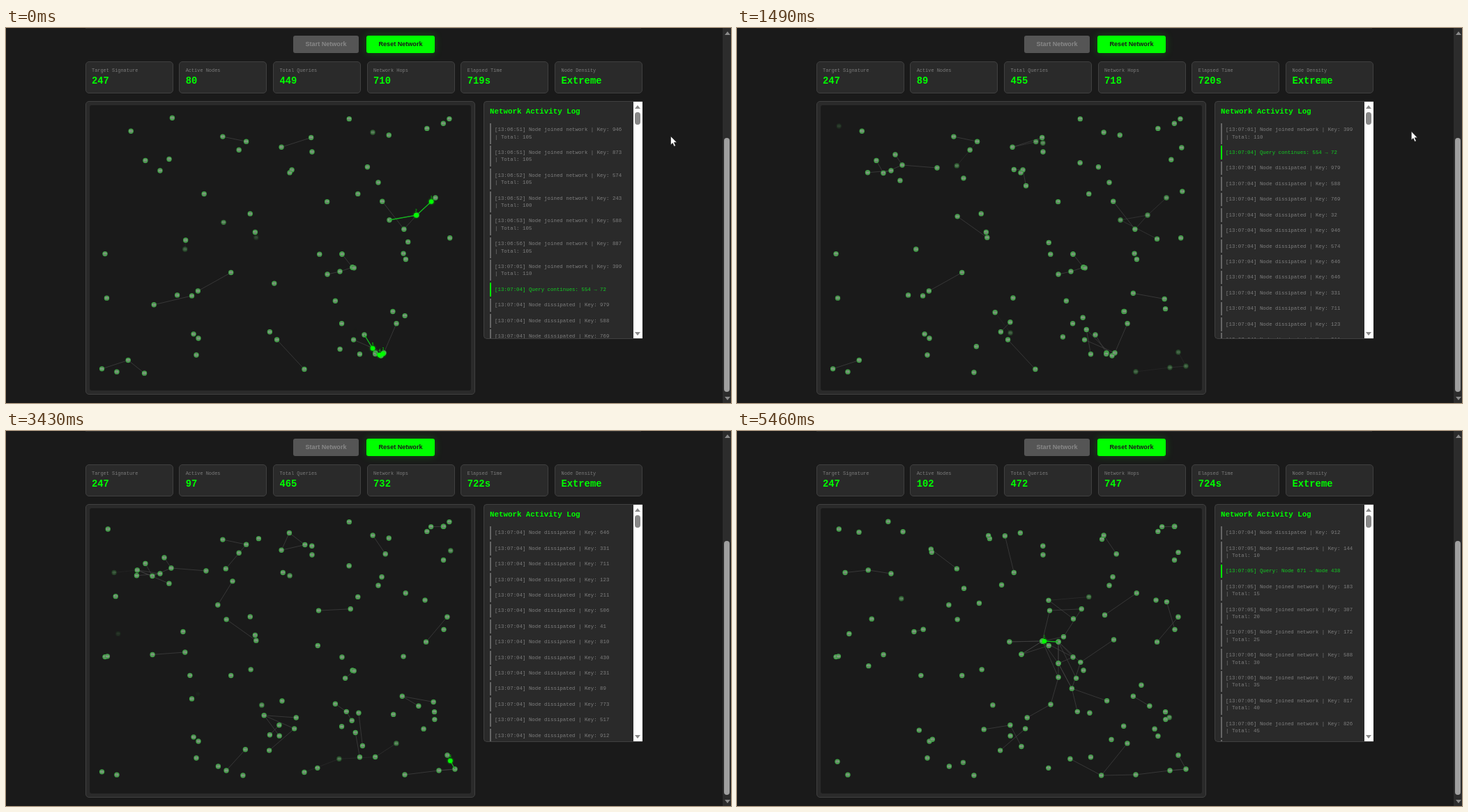
An HTML page with a canvas for the animation above (5540 ms loop, 1040 px wide and 539 px high).

```html
<!DOCTYPE html>
<html lang="en">
<head>
<meta charset="utf-8">
<title>Network simulation</title>
<style>
html, body { margin: 0; width: 100%; height: 100%; overflow: hidden; background: #1a1a1a; }
body { position: relative; font-family: "Liberation Mono", monospace; }
body * { box-sizing: border-box; position: absolute; }
.panel { background: #2a2a2a; border: 1px solid #404040; border-radius: 5px; }
.rule { left: 114px; top: 0; width: 797px; height: 1px; background: #303030; }
.button { top: 11px; height: 25px; border-radius: 3px; text-align: center;
  font: bold 9.07px/25px "Liberation Sans", sans-serif; }
#start { left: 412px; width: 94px; background: #555; color: #888; }
#reset { left: 517px; width: 98px; background: #0f0; color: #1a1a1a; box-shadow: 0 0 12px rgba(0,255,0,.25); }
.card { top: 47.5px; width: 126px; height: 46px; }
.card span, .card b { left: 8.5px; white-space: pre; }
.card span { top: 8px; font-size: 6.91px; line-height: 9px; color: #7c7c7c; }
.card b { top: 19px; font-size: 13.8px; line-height: 17px; color: #0f0; }
#net { left: 113.5px; top: 104.5px; width: 559.5px; height: 422.5px; }
#log { left: 685px; top: 104.5px; width: 227.5px; height: 342px; overflow: hidden; border-right: 0; border-radius: 5px 0 0 5px; }
#log h2 { left: 8px; top: 7px; margin: 0; font-size: 10.8px; line-height: 15px; color: #0f0; white-space: pre; }
#list { left: 8px; top: 31.2px; width: 204px; }
#list p { position: relative; margin: 0 0 2.85px; padding: 4.6px 0 4.6px 5px; border-left: 2px solid #666;
  font-size: 7.41px; line-height: 10.37px; color: #7e7e7e; white-space: pre; }
#list p.query { color: #12cc22; border-color: #0f0; }
#bar { right: 0; top: 0; width: 13px; height: 100%; background: #fff; }
#bar i { left: 2.5px; top: 15px; width: 8px; height: 18px; border-radius: 4px; background: #888; }
#page { left: 1028px; top: 0; width: 12px; height: 539px; background: #2c2c2c; }
#page i { left: 2px; top: 158px; width: 7.5px; height: 365px; border-radius: 4px; background: #9f9f9f; }
.up, .down { left: 2.5px; top: 5px; border: 4px solid transparent; border-top-width: 0; border-bottom: 5px solid #8a8a8a; }
.down { top: auto; bottom: 4px; transform: scaleY(-1); }
canvas, #cursor { left: 0; top: 0; }
</style>
</head>
<body>
<div class="rule"></div>
<div id="start" class="button">Start Network</div>
<div id="reset" class="button">Reset Network</div>
<div id="net" class="panel"></div>
<div id="log" class="panel">
  <h2>Network Activity Log</h2>
  <div id="list"></div>
  <div id="bar"><i></i><s class="up"></s><s class="down"></s></div>
</div>
<div id="page"><i></i><s class="up"></s><s class="down"></s></div>
<canvas id="view" width="1040" height="539"></canvas>
<svg id="cursor" width="12" height="18"><path d="M.5 .5V13L3.3 10.4 5.4 15.2 7.5 14.3 5.4 9.6H9.3Z" fill="#fff" stroke="#111" stroke-width=".6"/></svg>
<script>
const LOOP = 5540, RISE = 300, FALL = 150, HOP = 400;
const MARKS = [0, 870, 2040, 3430, 4210, 4910, 5460];
const $ = id => document.getElementById(id);
const lerp = (a, b, k) => a + (b - a) * k;
const clamp = v => Math.max(0, Math.min(1, v));

let seed = 247;
function random() {
  seed = (seed * 16807) % 2147483647;
  return seed / 2147483647;
}

function add(parent, tag, text, cls = '') {
  const el = document.createElement(tag);
  el.className = cls;
  el.textContent = text;
  return parent.appendChild(el);
}

// Whole part of the value between those given at MARKS
function count(values, t) {
  let i = 0;
  while (i < 5 && t >= MARKS[i + 1]) i++;
  const k = clamp((t - MARKS[i]) / (MARKS[i + 1] - MARKS[i]));
  return Math.floor(lerp(values[i], values[i + 1], k) + 1e-6);
}

const stats = [
  ['Target Signature', () => 247],
  ['Active Nodes', t => count([80, 84, 95, 97, 100, 98, 102], t)],
  ['Total Queries', t => count([449, 452, 458, 465, 467, 472, 472], t)],
  ['Network Hops', t => count([710, 714, 722, 732, 735, 747, 747], t)],
  ['Elapsed Time', t => 719 + Math.floor((t + 360) / 1000) + 's'],
  ['Node Density', () => 'Extreme']
].map(([label, value], i) => {
  const card = add(document.body, 'div', '', 'panel card');
  card.style.left = 113.5 + i * 134.7 + 'px';
  add(card, 'span', label);
  return { el: add(card, 'b', ''), value };
});

const entries = [];
const entry = (time, text, cls) => entries.push(add($('list'), 'p', `[13:${time}] ${text}`, cls));
const joined = (time, key, total) => entry(time, `Node joined network | Key: ${key}\n| Total: ${total}`);
joined('06:51', 946, 105);
joined('06:51', 873, 105);
joined('06:52', 574, 105);
joined('06:52', 243, 100);
joined('06:53', 588, 105);
joined('06:56', 887, 105);
joined('07:01', 399, 110);
entry('07:04', 'Query continues: 554 → 72', 'query');
for (const key of [979, 588, 769, 32, 946, 574, 646, 646, 331, 711, 123, 211, 506, 41, 810, 430, 231, 89, 773, 517, 912])
  entry('07:04', 'Node dissipated | Key: ' + key);
joined('07:05', 144, 10);
entry('07:05', 'Query: Node 671 → Node 438', 'query');
[183, 307, 172].forEach((key, i) => joined('07:05', key, 15 + i * 5));
[588, 660, 817, 826, 402].forEach((key, i) => joined('07:06', key, 30 + i * 5));

const nodes = [], links = [], queries = [];
const fade = (o, t) => clamp(Math.min((t - o.born) / RISE, (o.gone - t) / FALL));

// Packets leave at each start time and take one hop after another
function route(points, ...starts) {
  const born = Math.min(...starts) - 1000;
  const gone = Math.max(...starts) + HOP * points.length + 800;
  points.forEach(([x, y], i) => {
    nodes.push({ x, y, born, gone });
    if (i) links.push(nodes.slice(-2));
  });
  for (const start of starts) queries.push({ points, start });
}
const top1 = [461, 303], mid = [461, 334], low = [461, 354], left = [438, 302], end = [408, 321];
route([[550, 276], [589, 269], [616, 244]], -712, -392);
route([[514, 441], [530, 467], [538, 471], [542, 467]], -1080, -700, -300);
route([[482, 325], [497, 344], [479, 350], low], 200);
route([[227, 182], [237, 197], [287, 201]], 1660);
route([[572, 494], [621, 488], [644, 486], [633, 466]], 2390, 3435);
route([mid, top1, left], 4710);
route([top1, left, end], 4522, 4650);
route([left, end], 4522, 4678);
route([[450, 393], low, mid], 4522);

// Nodes that stay through the whole loop
for (const [x, y] of [[439, 178], [534, 222], [276, 446], [273, 470], [221, 205], [482, 325], [497, 344]])
  nodes.push({ x, y, born: -RISE, gone: 2 * LOOP });

// The rest join one by one at random places and dissipate later
const FIRST = 56, JOIN = 50;
for (let i = 0; i < FIRST + LOOP / JOIN; i++) {
  const born = i < FIRST ? -RISE : (i - FIRST) * JOIN - 200;
  const gone = i < FIRST ? 6200 * random() + FALL : born + 1500 + 6500 * random();
  nodes.push({ x: lerp(135, 645, random()), y: lerp(126, 506, random()), born, gone });
}

// Some close neighbours are linked
nodes.forEach((a, i) => {
  for (const b of nodes.slice(0, i)) {
    const d = Math.hypot(a.x - b.x, a.y - b.y);
    if (d > 8 && d < 60 && random() < .12) links.push([a, b]);
  }
});

const c = $('view').getContext('2d');
c.textAlign = 'center';
c.textBaseline = 'middle';
function line(x0, y0, x1, y1) {
  c.beginPath();
  c.moveTo(x0, y0);
  c.lineTo(x1, y1);
  c.stroke();
}
function dot(x, y, r) {
  c.beginPath();
  c.arc(x, y, r, 0, 7);
  c.fill();
}

function drawNode(n) {
  c.fillStyle = '#3fa546';
  dot(n.x, n.y, 3.7);
  c.fillStyle = '#6f806f';
  dot(n.x, n.y, 2.4);
  c.fillStyle = '#9c9';
  c.fillText(100 + Math.floor(n.x * n.y % 900), n.x, n.y);
}

function drawQuery({ points, start }, t, i) {
  const k = (t - start) / HOP, hop = Math.floor(k);
  if (k < 0 || hop + 1 >= points.length) return;
  const [x0, y0] = points[hop], [x1, y1] = points[hop + 1];
  const x = lerp(x0, x1, k % 1), y = lerp(y0, y1, k % 1);
  c.strokeStyle = '#12b81c';
  c.lineWidth = 1.3;
  line(x0, y0, x, y);
  c.shadowColor = '#0f0';
  c.shadowBlur = 3;
  c.fillStyle = '#0f0';
  dot(x, y, 3.2);
  c.shadowBlur = 0;
  c.fillText(i % 9 + 1, x, y - 6);
}

function drawNetwork(t) {
  c.globalAlpha = 1;
  c.clearRect(0, 0, 1040, 539);
  c.fillStyle = '#1a1a1a';
  c.beginPath();
  c.roundRect(120, 111, 547, 410, 3);
  c.fill();
  c.strokeStyle = '#444';
  c.lineWidth = .7;
  for (const [a, b] of links) {
    c.globalAlpha = Math.min(fade(a, t), fade(b, t));
    if (c.globalAlpha) line(a.x, a.y, b.x, b.y);
  }
  c.font = '3px "Liberation Mono", monospace';
  for (const n of nodes) {
    c.globalAlpha = fade(n, t);
    if (c.globalAlpha) drawNode(n);
  }
  c.globalAlpha = 1;
  c.font = '4.5px "Liberation Mono", monospace';
  queries.forEach((q, i) => drawQuery(q, t, i));
}

function frame(now) {
  const t = now % LOOP;
  for (const s of stats) s.el.textContent = s.value(t);
  const first = count([0, 3, 9, 15, 19, 23, 28], t);
  entries.forEach((e, i) => e.style.display = i < first ? 'none' : '');
  drawNetwork(t);
  const glide = clamp((t - 1260) / 470), x = lerp(953 + 2 * clamp(t / 800), 979, glide);
  $('cursor').style.transform = `translate(${x}px, ${lerp(155, 141, glide)}px)`;
  $('cursor').style.display = t < 3200 ? '' : 'none';
  requestAnimationFrame(frame);
}
requestAnimationFrame(frame);
</script>
</body>
</html>
```
